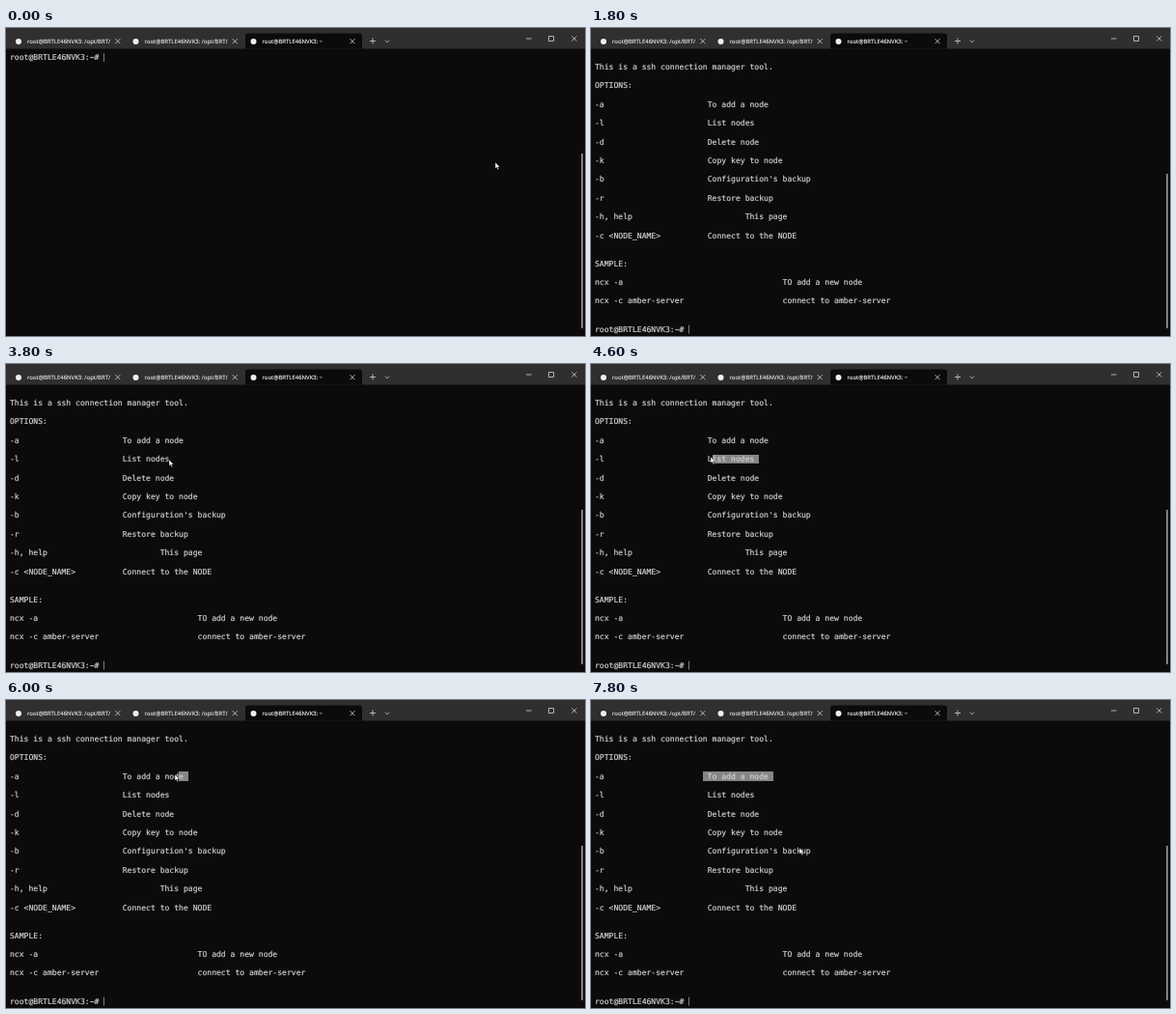
These frames come from a looping animation (600x319 px, 8 s). An HTML page:

```html
<!DOCTYPE html>
<html lang="en">
<head>
<meta charset="utf-8">
<title>Terminal help</title>
<style>
  html, body { margin: 0; width: 100%; height: 100%; overflow: hidden; background: #0c0a0c; }
  svg, pre, .term div { position: absolute; margin: 0; }
  svg { left: 0; top: 0; }

  .tabs text {
    font: 5.97px "Open Sans", sans-serif; fill: #eee; stroke: #eee; stroke-width: .12;
    text-rendering: geometricPrecision;
  }
  .tabs .active { font-weight: 500; fill: #fff; stroke: #fff; }
  .icons { fill: none; stroke: #d6d6d6; stroke-width: .8; }

  /* One character cell is 1ch wide and one row high. */
  .term {
    --row: 9.71px;
    position: absolute; left: 4px; top: 25.6px; width: 590px; height: 293px;
    font: 8.09px/9.71px "DejaVu Sans Mono", monospace; color: #d2d2d2;
    text-rendering: geometricPrecision;
  }
  .term pre { left: 0; top: .6px; font: inherit; -webkit-text-stroke: .18px; }
  .term .mark { height: var(--row); background: #868586; width: 0; }
  .mark.list { top: calc(7 * var(--row)); right: calc(100% - 35ch); }
  .mark.add { top: calc(5 * var(--row)); right: calc(100% - 38ch); }
  /* The caret's background hides the letters not typed yet. */
  .term .caret {
    left: 20ch; top: 0; width: 8ch; height: var(--row);
    box-sizing: border-box; border-left: 1px solid #7c7c7c; background: #0c0a0c;
  }
  .term .scroll { left: 592px; top: 104.4px; width: 2px; height: 181px; background: #82817f; }

  .prompt, .help, .caret, .scroll, .mark, .mouse { animation: 8s step-end -20ms infinite; }
  .prompt { animation-name: prompt; }
  .help { animation-name: help; }
  .caret { animation-name: type; }
  .scroll { animation-name: scroll; }
  .mark.list { animation-name: mark-list; }
  .mark.add { animation-name: mark-add; }
  .mouse { animation-name: mouse; }

  @keyframes prompt { 22.5%, 100% { visibility: hidden; } }
  @keyframes help { 0% { visibility: hidden; } 22.5%, 100% { visibility: visible; } }
  @keyframes scroll { 22.5%, 100% { top: 125.4px; height: 160px; } }
  @keyframes type {
    0% { transform: none; }
    7.5% { transform: translateX(1ch); }
    10% { transform: translateX(2ch); }
    12.5% { transform: translateX(3ch); }
    15% { transform: translateX(5ch); }
    17.5% { transform: translateX(6ch); }
    22.5%, 100% { transform: translateY(calc(29 * var(--row))); }
  }
  @keyframes mark-list {
    0% { width: 0; }
    50% { width: 1ch; }
    52.5% { width: 3ch; }
    55% { width: 7ch; }
    57.5% { width: 10ch; }
    60% { width: 13ch; }
    72.5%, 100% { width: 0; }
  }
  @keyframes mark-add {
    0% { width: 0; }
    72.5% { width: 1ch; }
    75% { width: 2ch; }
    77.5% { width: 12ch; }
    80%, 100% { width: 15ch; }
  }
  @keyframes mouse {
    0% { transform: translate(507px, 139px); }
    7.5% { transform: translate(-20px, 0); }
    35% { transform: translate(318px, 132px); }
    37.5% { transform: translate(253px, 129px); }
    40% { transform: translate(203px, 121px); }
    45% { transform: translate(186px, 108px); }
    47.5% { transform: translate(169px, 99px); }
    50% { transform: translate(168px, 98px); }
    52.5% { transform: translate(160px, 97px); }
    55% { transform: translate(142px, 96px); }
    57.5% { transform: translate(124px, 96px); }
    60% { transform: translate(113px, 96px); }
    65% { transform: translate(136px, 88px); }
    67.5% { transform: translate(169px, 76px); }
    70% { transform: translate(182px, 77px); }
    72.5% { transform: translate(184px, 77px); }
    75% { transform: translate(175px, 77px); }
    77.5% { transform: translate(131px, 77px); }
    80% { transform: translate(118px, 77px); }
    87.5% { transform: translate(130px, 85px); }
    90% { transform: translate(155px, 105px); }
    92.5% { transform: translate(185px, 130px); }
    95% { transform: translate(207px, 147px); }
    97.5%, 100% { transform: translate(216px, 153px); }
  }
</style>
</head>
<body>
<svg class="tabs" width="600" height="22">
  <defs>
    <path id="cross" d="M-2.5-2.5l5 5m0-5l-5 5"/>
  </defs>
  <rect width="600" height="21.5" fill="#302e2f"/>
  <path d="M248 21.5V8.5q0-3 3-3h115q3 0 3 3v13z" fill="#0c0a0c"/>
  <g fill="#eee">
    <circle cx="13" cy="14" r="3"/>
    <circle cx="134.5" cy="14" r="3"/>
    <circle cx="256.5" cy="14" r="3"/>
  </g>
  <text x="22" y="16">root@BRTLE46NVK3: /opt/BRT/</text>
  <text x="143.5" y="16">root@BRTLE46NVK3: /opt/BRT/</text>
  <text x="265.5" y="16" class="active">root@BRTLE46NVK3: ~</text>
  <g class="icons">
    <use href="#cross" x="115.8" y="13.7"/>
    <use href="#cross" x="237.2" y="13.7"/>
    <use href="#cross" x="359" y="13.7"/>
    <path d="M377 13.5h6m-3-3v6M393 12.8l2 2 2-2"/>
    <path d="M539 11h5.5M562.5 8.5h5v5h-5z"/>
    <use href="#cross" x="588.8" y="11"/>
  </g>
</svg>

<div class="term">
  <div class="mark list"></div>
  <div class="mark add"></div>
  <pre class="prompt">root@BRTLE46NVK3:~# ncv -h</pre>
  <pre class="help">

This is a ssh connection manager tool.

OPTIONS:

-a                      To add a node

-l                      List nodes

-d                      Delete node

-k                      Copy key to node

-b                      Configuration's backup

-r                      Restore backup

-h, help                        This page

-c &lt;NODE_NAME&gt;          Connect to the NODE


SAMPLE:

ncx -a                                  TO add a new node

ncx -c amber-server                     connect to amber-server


root@BRTLE46NVK3:~#</pre>
  <div class="caret"></div>
  <div class="scroll"></div>
</div>

<svg width="600" height="319">
  <path class="mouse" d="M0 0v6.6l1.5-1.3 1 2.4 1.1-.5-1-2.2h2z" fill="#fff" stroke="#000" stroke-width=".4"/>
</svg>
</body>
</html>
```
